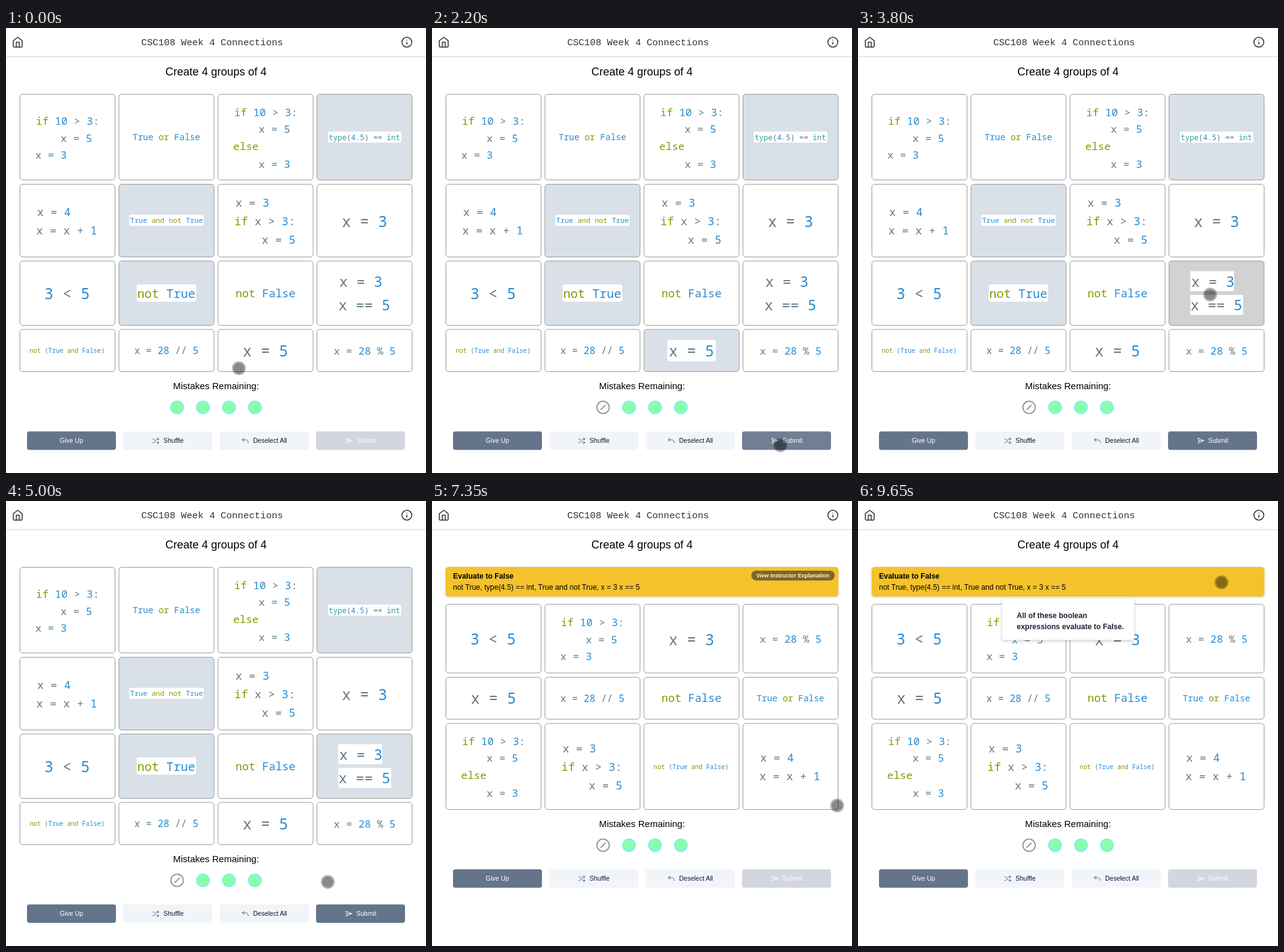
These frames come from a looping animation (680 by 722 pixels, 10000 ms). An HTML page:

```html
<!DOCTYPE html>
<html lang="en">
<head>
<meta charset="utf-8">
<title>Connections</title>
<style>
html, body { margin: 0; width: 100%; height: 100%; overflow: hidden; background: #fff; }
svg { display: block; width: 680px; height: 722px; font-family: "Liberation Sans", Arial, sans-serif; }
text { white-space: pre; }
.code { font-family: "Noto Sans Mono", monospace; fill: #657b83; }
.title { font-family: "Liberation Mono", monospace; font-size: 15.3px; fill: #333; }
.line { fill: none; stroke-linecap: round; stroke-linejoin: round; }
</style>
</head>
<body>
<svg id="stage" viewBox="0 0 680 722"></svg>
<script>
const stage = document.getElementById('stage');
const LOOP = 10000, STEP = 50;

function add(parent, tag, attrs = {}, content) {
  const el = document.createElementNS('http://www.w3.org/2000/svg', tag);
  set(el, attrs);
  if (content !== undefined) el.textContent = content;
  return parent.appendChild(el);
}
function set(el, attrs) {
  for (const k in attrs) el.setAttribute(k, attrs[k]);
}
const group = (parent, attrs) => add(parent, 'g', attrs);
const rect = (parent, x, y, width, height, rx, attrs) =>
  add(parent, 'rect', { x, y, width, height, rx, ...attrs });
const label = (parent, x, y, size, str, attrs) =>
  add(parent, 'text', { x, y, 'font-size': size, ...attrs }, str);
const clamp = v => Math.max(0, Math.min(1, v));
const smooth = p => p * p * (3 - 2 * p);
const mix = (a, b, p) => `rgb(${a.map((v, i) => Math.round(v + (b[i] - v) * p))})`;
const show = (el, on) => set(el, { visibility: on ? 'visible' : 'hidden' });

// Tile content: character advance, lines [x, baseline, text], white boxes
const tiles = [
  { adv: 10.25, lines: [[48.5, 156.5, 'if 10 > 3:'], [88.3, 184.5, 'x = 5'], [47.3, 211.5, 'x = 3']] },
  { adv: 8.42, lines: [[205, 182, 'True or False']] },
  { adv: 10.25, lines: [[369.5, 142.5, 'if 10 > 3:'], [409, 169.5, 'x = 5'], [368, 197.5, 'else'], [409, 226.5, 'x = 3']] },
  { adv: 7.22, lines: [[522.6, 181.5, 'type(4.5) == int']], boxes: [[521, 168, 119, 18, 3]] },
  { adv: 10.95, lines: [[50.2, 304.5, 'x = 4'], [49, 334.5, 'x = x + 1']] },
  { adv: 6.93, lines: [[201, 316.3, 'True and not True']], boxes: [[199.5, 303, 120.5, 18, 3]] },
  { adv: 10.93, lines: [[371.5, 289.5, 'x = 3'], [369.8, 319.5, 'if x > 3:'], [414, 349.5, 'x = 5']] },
  { adv: 14.7, lines: [[543.7, 323, 'x = 3']] },
  { adv: 14.75, lines: [[62, 439.5, '3 < 5']] },
  { adv: 11.75, lines: [[212.6, 438, 'not True']], boxes: [[211.5, 416, 96.5, 28, 4]] },
  { adv: 10.8, lines: [[371.5, 436.5, 'not False']] },
  { adv: 14, lines: [[539.5, 419.5, 'x = 3'], [538.2, 458, 'x == 5']], boxes: [[538, 394.5, 71, 32.5, 0], [538, 433, 85.5, 32.5, 0]] },
  { adv: 6.08, lines: [[38.2, 527, 'not (True and False)']] },
  { adv: 9.45, lines: [[207.7, 529, 'x = 28 // 5']] },
  { adv: 14.7, lines: [[383.3, 532.5, 'x = 5']], boxes: [[381, 506, 78.5, 35, 4]] },
  { adv: 10.05, lines: [[530.4, 529.5, 'x = 28 % 5']] }
];
const rowsBefore = [[107.5, 139], [253.5, 118], [378, 104.5], [489, 68.5]];
const rowsAfter = [[167.5, 111.5], [286, 68], [361, 139.5]];
const orderAfter = [8, 0, 7, 15, 14, 13, 10, 1, 2, 6, 12, 4];
const TYPE = 3, AND_NOT = 5, NOT_TRUE = 9, EQUALS = 11, FIVE = 14;

function cell(rows, i) {
  const [y, h] = rows[i >> 2];
  return { x: 22.5 + 160.33 * (i % 4), y, h, mid: y + h / 2 };
}

function tint(word) {
  if (/^(if|else|or|and|not)$/.test(word)) return '#859900';
  if (/^(type|int)$/.test(word)) return '#2aa198';
  return '#268bd2';
}
function codeLine(parent, adv, [x, y, str]) {
  const el = label(parent, x, y, adv / 0.6, undefined, { class: 'code' });
  str.split(/\b(if|else|or|and|not|True|False|type|int|\d[\d.]*)\b/).forEach((part, i) => {
    if (part) add(el, 'tspan', i % 2 ? { fill: tint(part) } : {}, part);
  });
}

// Header
label(stage, 219, 27.5, 15.3, 'CSC108 Week 4 Connections', { class: 'title' });
rect(stage, 0, 46, 680, 1, 0, { fill: '#d4d4d4' });
const icon = (parent, x, y, scale, d, stroke, width) => add(parent, 'path', {
  d, stroke, 'stroke-width': width, class: 'line',
  transform: `translate(${x} ${y}) scale(${scale}) translate(-12 -12)`
});
icon(stage, 19, 23, 0.8, 'M3 9l9-7 9 7v11a2 2 0 0 1-2 2H5a2 2 0 0 1-2-2zM9 22V12h6v10', '#333', 1.9);
icon(stage, 649, 23, 0.8, 'M2 12a10 10 0 1 0 20 0a10 10 0 1 0-20 0M12 16v-4M12 8h.01', '#333', 1.9);
label(stage, 340, 77, 18, 'Create 4 groups of 4', { 'text-anchor': 'middle' });

// Grid
const grid = group(stage);
tiles.forEach((tile, i) => {
  tile.home = cell(rowsBefore, i);
  const slot = orderAfter.indexOf(i);
  tile.away = slot < 0 ? null : cell(rowsAfter, slot);
  tile.g = group(grid);
  tile.back = rect(tile.g, 0, 0, 154, 0, 4.5, { stroke: '#999', 'stroke-width': 1 });
  tile.face = group(tile.g);
  (tile.boxes || []).forEach(b => rect(tile.face, ...b, { fill: '#fff' }));
  tile.lines.forEach(l => codeLine(tile.face, tile.adv, l));
});

// Mistakes and buttons
const lower = group(stage);
label(lower, 340, 586, 15, 'Mistakes Remaining:', { 'text-anchor': 'middle' });
const dots = [277, 319, 361, 403].map(cx =>
  add(lower, 'circle', { cx, cy: 615.5, r: 10.3, fill: '#8bfdab', stroke: '#74f0f4', 'stroke-width': 1.6 }));
const lost = add(lower, 'path', {
  d: 'M267 615.5a10 10 0 1 0 20 0a10 10 0 1 0-20 0M273.5 619l7-7',
  class: 'line', stroke: '#9b9b9b', 'stroke-width': 2
});
function button(x, fill, str, tx, color) {
  const back = rect(lower, x, 654.5, 144, 30, 4, { fill });
  label(lower, tx, 673, 10.5, str, { fill: color });
  return back;
}
button(34, '#64748b', 'Give Up', 87, '#fff');
button(190, '#f1f5f9', 'Shuffle', 255, '#0f172a');
button(346, '#f1f5f9', 'Deselect All', 400, '#0f172a');
const submit = button(502, '#64748b', 'Submit', 567, '#fff');
icon(lower, 242.5, 669.8, 0.5, 'M18 14l4 4-4 4M18 2l4 4-4 4M2 18h2a4 4 0 0 0 3.3-1.7l5.4-8.6a4 4 0 0 1 3.3-1.7H22M2 6h2a4 4 0 0 1 3.6 2.2M22 18h-6a4 4 0 0 1-3.3-1.8', '#475569', 1.9);
const thin = (d, stroke) => add(lower, 'path', { d, stroke, class: 'line', 'stroke-width': 0.9 });
thin('M385.5 665.5l-3 2.6 3 2.6M382.5 668.1h5q4.5 0 4.8 4.6', '#475569');
thin('M550.5 665.5L560 669.5L550.5 673.5L552 669.5ZM552 669.5h8', '#fff');

// Solved banner
const banner = group(stage);
const plate = group(banner);
rect(plate, 22, 107, 636, 48, 5, { fill: '#f4c22b', style: 'filter:drop-shadow(0 1.5px 1.5px rgba(0,0,0,.22))' });
label(plate, 34, 126, 12, 'Evaluate to False', { 'font-weight': 700 });
label(plate, 34, 144, 12, 'not True, type(4.5) == int, True and not True, x = 3 x == 5');
const pill = group(banner);
const pillBack = rect(pill, 517, 113, 135, 16, 8);
label(pill, 525, 124.2, 9, 'View Instructor Explanation', { 'font-weight': 700, fill: '#fff6dc' });

// Explanation
const popover = group(stage);
rect(popover, 233, 158.5, 214.5, 67, 4, { fill: '#fff', stroke: '#e4e6ea', style: 'filter:drop-shadow(0 2px 2px rgba(0,0,0,.16))' });
['All of these boolean', 'expressions evaluate to False.'].forEach((str, i) =>
  label(popover, 257, 189.5 + 18 * i, 12, str, { 'font-weight': 700, fill: '#1a2236' }));

const cursor = group(stage);
add(cursor, 'circle', { r: 11.3, 'fill-opacity': 0.28 });
add(cursor, 'circle', { r: 9, 'fill-opacity': 0.25 });

const path = [
  [0, 377, 552], [250, 403, 532], [600, 403, 532], [1050, 564, 677],
  [2700, 564, 677], [3000, 425, 530], [3150, 425, 530], [3450, 570, 432.5],
  [3900, 570, 432.5], [4350, 521, 618], [6000, 521, 618], [6150, 545.5, 669],
  [6700, 545.5, 669], [7300, 635, 637], [7350, 656, 494], [7650, 667, 380],
  [8350, 588.5, 124], [9200, 588.5, 124], [9250, 588.5, 132], [LOOP, 588.5, 132]
];
function cursorAt(t) {
  const i = path.findIndex(k => k[0] > t);
  const [t0, x0, y0] = path[i - 1], [t1, x1, y1] = path[i];
  const p = smooth((t - t0) / (t1 - t0));
  return [x0 + (x1 - x0) * p, y0 + (y1 - y0) * p];
}

const SELECTED = '#d9e0e8', FRESH = '#d2d2d2';
function tileFill(i, t) {
  if (i === TYPE || i === AND_NOT || i === NOT_TRUE) return SELECTED;
  if (i === FIVE && t >= 600 && t < 3100) return t < 850 ? FRESH : SELECTED;
  if (i === EQUALS && t >= 3800) return t < 4850 ? FRESH : SELECTED;
  return '#fff';
}
function submitFill(t) {
  const ready = (t >= 600 && t < 3100) || (t >= 3800 && t < 6300);
  if (!ready) return '#d2d6de';
  return (t >= 1000 && t < 2800) || t >= 6150 ? '#717f95' : '#64748b';
}
// Critically damped spring
function spring(ms) {
  const s = 13.04 * Math.max(0, ms) / 1000;
  return 1 - (1 + s) * Math.exp(-s);
}

function draw(t) {
  const solved = t >= 6300, missed = t >= 1100;
  const tilt = t > 1700 && t < 2700 ? Math.sin((t - 1700) / 500 * 2 * Math.PI) : 0;
  set(grid, { transform: `rotate(${tilt} 340 332.5)` });
  tiles.forEach((tile, i) => {
    const at = solved ? tile.away : tile.home;
    show(tile.g, at);
    if (!at) return;
    set(tile.back, { x: at.x, y: at.y, height: at.h, fill: solved ? '#fff' : tileFill(i, t) });
    set(tile.face, { transform: `translate(${at.x - tile.home.x} ${at.mid - tile.home.mid})` });
  });

  set(lower, { transform: `translate(0 ${solved ? -57 : 0})` });
  show(dots[0], !missed);
  show(lost, missed);
  set(submit, { fill: submitFill(t) });

  const p = spring(t - 6425);
  show(banner, solved);
  set(banner, { transform: `translate(0 ${48 * (1 - p)})` });
  set(plate, { opacity: p });
  set(pill, { opacity: t < 8450 ? clamp(p * 2) : 0 });
  set(pillBack, { fill: mix([154, 154, 154], [126, 102, 40], clamp(p * 2 - 1)) });

  const open = smooth(clamp((t - 8400) / 250));
  const zoom = 0.95 + 0.05 * open;
  set(popover, {
    opacity: open,
    transform: `translate(340 158.5) scale(${zoom}) translate(-340 -158.5)`
  });
  set(cursor, { transform: `translate(${cursorAt(t)})` });
}

const start = performance.now();
function tick() {
  const t = (performance.now() - start) % LOOP;
  draw(Math.floor(t / STEP) * STEP);
  requestAnimationFrame(tick);
}
tick();
</script>
</body>
</html>
```
